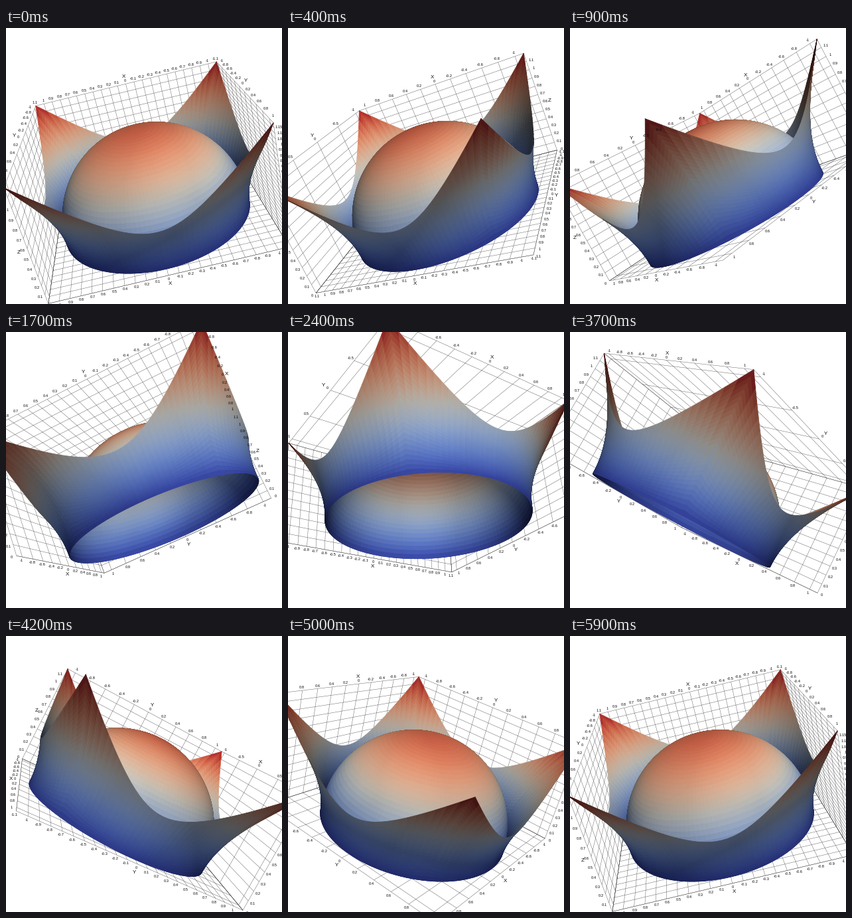
A matplotlib script for the animation above (6000 ms loop, 416 by 416 pixels).

```python
import numpy as np
import matplotlib.pyplot as plt
from matplotlib.animation import FuncAnimation
from matplotlib.collections import LineCollection, PolyCollection

SIZE, DPI = 416, 100
FRAMES, INTERVAL = 60, 100
SIDE = 1.1
TOP = np.sqrt(2 * SIDE**2 - 1)
HALF = np.array([SIDE, SIDE, TOP / 2])
MID = np.array([0, 0, TOP / 2])
FOCAL = SIZE / 2 / np.tan(np.radians(15))

# Orbit: plane normal, first eye direction and the direction it moves in
AXIS = np.array([-0.233, -0.4214, 0.8762])
AXIS /= np.linalg.norm(AXIS)
SWEEP = np.array([-0.972, 0.0757, -0.222])
SWEEP -= AXIS * (SWEEP @ AXIS)
SWEEP /= np.linalg.norm(SWEEP)
START = np.cross(SWEEP, AXIS)
RADIUS, DROP = 5.33, 0.105

# A box face is drawn while it turns to the eye by less than this cosine
FACING_LIMIT = 0.035


def light(azimuth, elevation, strength, rgb):
    a, e = np.radians([azimuth, elevation])
    aim = np.array([np.cos(e) * np.sin(a), np.sin(e), np.cos(e) * np.cos(a)])
    return aim, strength * np.array(rgb)


LIGHTS = [
    light(10, 50, 0.75, (1, 0.97, 0.90)),
    light(0, -75, 0.25, (0.90, 0.93, 1)),
    light(0, 0, 0.25, (1, 1, 1)),
    light(110, 0, 0.214, (1, 1, 1)),
    light(-110, 0, 0.214, (1, 1, 1)),
]


def quads(x, y, z):
    p = np.stack([x, y, z], axis=-1)
    q = np.stack([p[:-1, :-1], p[1:, :-1], p[1:, 1:], p[:-1, 1:]], axis=2)
    return q.reshape(-1, 4, 3)


def build_surface(cols=128, dome_rows=32, wall_rows=26):
    """z = sqrt(|1 - x^2 - y^2|): a half sphere inside, a flared wall outside."""
    turn = np.linspace(0, 2 * np.pi, cols + 1)
    tilt = np.linspace(0, np.pi / 2, dome_rows + 1)[:, None]
    dome = quads(np.sin(tilt) * np.cos(turn), np.sin(tilt) * np.sin(turn),
                 np.cos(tilt) + 0 * turn)
    reach = SIDE / np.maximum(abs(np.cos(turn)), abs(np.sin(turn)))
    z = np.linspace(0, 1, wall_rows + 1)[:, None] * np.sqrt(reach**2 - 1)
    r = np.sqrt(1 + z**2)
    wall = quads(r * np.cos(turn), r * np.sin(turn), z)
    return dome, wall


dome, wall = build_surface()
cells = np.concatenate([dome, wall])
is_wall = np.arange(len(cells)) >= len(dome)
centres = cells.mean(axis=1)
normals = centres * np.where(is_wall[:, None], [1, 1, -1], [1, 1, 1])
normals /= np.linalg.norm(normals, axis=1, keepdims=True)
base = plt.get_cmap("coolwarm")(centres[:, 2] / TOP)[:, :3]
cells = cells - MID
centres = centres - MID
headings = centres[:, :2] / np.linalg.norm(centres[:, :2], axis=1, keepdims=True)


class Camera:
    def __init__(self, phi):
        c, s = np.cos(phi), np.sin(phi)
        self.eye = RADIUS * (c * START + s * SWEEP) - DROP * AXIS
        self.dist = np.linalg.norm(self.eye)
        self.back = self.eye / self.dist
        right = c * SWEEP - s * START
        self.basis = np.array([right, np.cross(self.back, right), self.back])

    def project(self, points):
        v = np.asarray(points) @ self.basis.T
        scale = FOCAL / (self.dist - v[..., 2])
        return np.stack([SIZE / 2 + v[..., 0] * scale,
                         SIZE / 2 - v[..., 1] * scale], axis=-1)


def shade(cam):
    facing = np.sum(normals * (cam.eye - centres), axis=1)
    n = (normals * np.where(facing < 0, -1, 1)[:, None]) @ cam.basis.T
    glow = sum(np.clip(n @ aim, 0, None)[:, None] * rgb for aim, rgb in LIGHTS)
    return np.clip(base * glow, 0, 1)


def paint_order(cam):
    # Far wall columns, then the dome, then near wall columns
    flat = np.linalg.norm(cam.eye[:2])
    score = np.where(is_wall, headings @ cam.eye[:2] / flat, 1 / flat)
    gap = np.linalg.norm(cam.eye - centres, axis=1)
    return np.lexsort((-gap, score))


def point(i, a, j, b, k, c):
    p = np.zeros(3)
    p[[i, j, k]] = a, b, c
    return p


def tick_step(cam, i, s, j, k):
    """Smallest round step that keeps labels of axis j apart on a face."""
    ends = np.array([[point(i, s * HALF[i], j, e * HALF[j], k, t * HALF[k])
                      for e in (-1, 1)] for t in (-1, 1)])
    xy = cam.project(ends)
    dx, dy = abs(xy[:, 1] - xy[:, 0]).mean(axis=0)
    length, room = (dx - dy / 2, 9.7) if dx >= dy else (dy, 6.72)
    for step in (0.05, 0.1, 0.2, 0.5):
        if length / (2 * HALF[j]) * step >= room:
            return step
    return 1


def ticks(j, step):
    lo, hi = MID[j] - HALF[j], MID[j] + HALF[j]
    first, last = np.ceil(lo / step - 1e-6), np.floor(hi / step + 1e-6)
    return np.arange(first, last + 1) * step


def grid(cam):
    """Lines and texts of all box faces that lie behind the surface."""
    back = {(i, s): s * cam.back[i] < FACING_LIMIT
            for i in range(3) for s in (-1, 1)}
    lines, texts = [], []
    for (i, s), shown in back.items():
        if not shown:
            continue
        for j in range(3):
            if j == i:
                continue
            k = 3 - i - j
            marks = ticks(j, tick_step(cam, i, s, j, k))
            for v in [*(marks - MID[j]), -HALF[j], HALF[j]]:
                lines.append(cam.project([point(i, s * HALF[i], j, v, k, t * HALF[k])
                                          for t in (-1, 1)]))
            for t in (-1, 1):
                if not back[k, t]:
                    texts += edge_texts(cam, i, s, j, k, t, marks)
    return lines, texts


def edge_texts(cam, i, s, j, k, t, marks):
    def spot(v):
        return cam.project(point(i, s * HALF[i], j, v, k, t * HALF[k]))

    a, b = spot(-HALF[j]), spot(HALF[j])
    out = np.array([b[1] - a[1], a[0] - b[0]])
    out /= np.linalg.norm(out) + 1e-9
    if out @ ((a + b) / 2 - SIZE / 2) < 0:
        out = -out
    push = 4.5 + 3 * abs(out[0])
    found = [(spot(v - MID[j]) + out * push, f"{round(v, 2) + 0:g}", 5.8)
             for v in marks]
    found.append((spot(0) + out * (push + 6.5), "XYZ"[j], 8))
    return found


fig = plt.figure(figsize=(SIZE / DPI, SIZE / DPI), dpi=DPI, facecolor="white")
ax = fig.add_axes([0, 0, 1, 1])
ax.set_xlim(0, SIZE)
ax.set_ylim(SIZE, 0)
ax.axis("off")

mesh_lines = LineCollection([], colors="0.3", linewidths=0.3, zorder=1)
surface = PolyCollection([], linewidths=0.6, zorder=2)
ax.add_collection(mesh_lines, autolim=False)
ax.add_collection(surface, autolim=False)
labels = []


def draw(k):
    cam = Camera(2 * np.pi * k / (FRAMES - 1))
    order = paint_order(cam)
    colours = shade(cam)[order]
    surface.set_verts(cam.project(cells[order]))
    surface.set_facecolor(colours)
    surface.set_edgecolor(colours)

    lines, texts = grid(cam)
    mesh_lines.set_segments(lines)
    while labels:
        labels.pop().remove()
    for (x, y), word, px in texts:
        if -8 < x < SIZE + 8 and -8 < y < SIZE + 8:
            labels.append(ax.text(x, y, word, fontsize=px * 72 / DPI,
                                  family="Liberation Sans", color="0.05",
                                  ha="center", va="center_baseline", zorder=3))
    return [mesh_lines, surface, *labels]


anim = FuncAnimation(fig, draw, frames=FRAMES, interval=INTERVAL,
                     init_func=lambda: [], repeat=True, repeat_delay=0)
plt.show()
```
